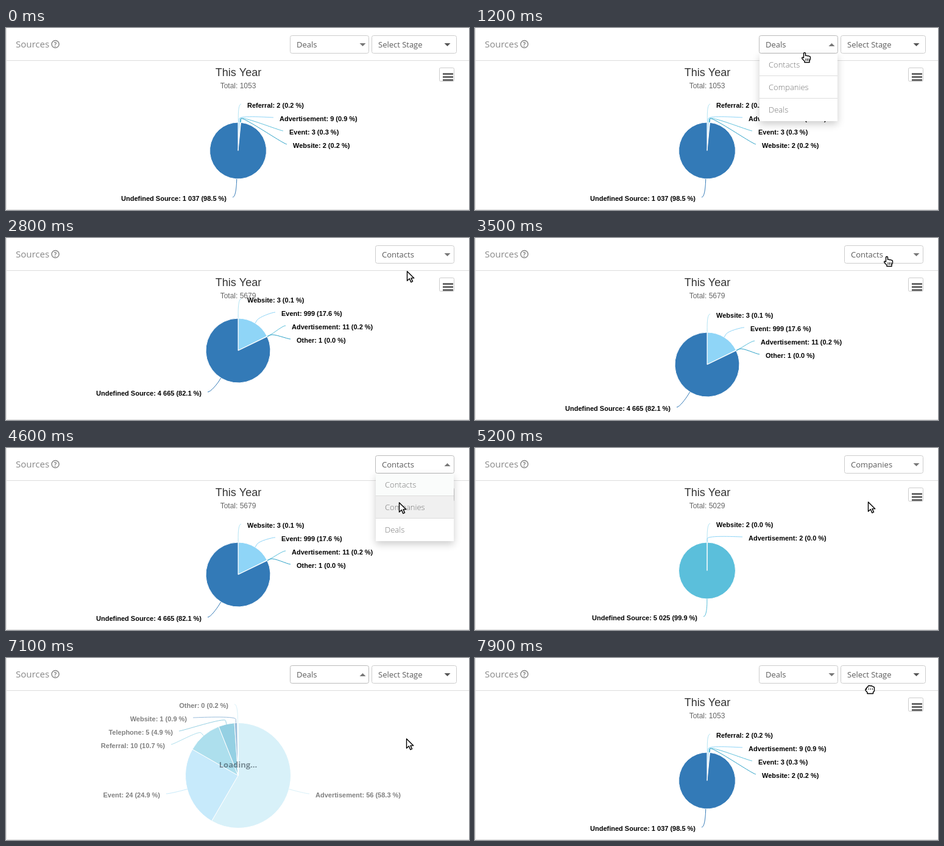
Animation, 760 px wide and 299 px high, one loop 8 s. Source, as an HTML page with a canvas:

```html
<!DOCTYPE html>
<html lang="en">
<head>
<meta charset="utf-8">
<title>Sources</title>
<style>
html, body { margin: 0; width: 100%; height: 100%; overflow: hidden; background: #fff; }
canvas { display: block; }
</style>
</head>
<body>
<canvas id="stage" width="760" height="299"></canvas>
<script>
const c = document.getElementById('stage').getContext('2d');
const LOOP = 8000, CX = 381;
const UI = '"Open Sans", sans-serif', CHART = '"Liberation Sans", Arial, sans-serif';
const PALETTE = ['#b1e3f3', '#8fd5f7', '#5bbfdb', '#2ba1c7', '#337ab7', '#b1e3f3'];
const OPTIONS = ['Contacts', 'Companies', 'Deals'];

// slices: [weight, label, x of the label's near end, baseline]
const charts = {
  Deals: { cy: 201.5, r: 46.5, total: 1053, slices: [
    [2, 'Referral: 2 (0.2 %)', 396, 131],
    [9, 'Advertisement: 9 (0.9 %)', 449, 153],
    [3, 'Event: 3 (0.3 %)', 465, 175],
    [2, 'Website: 2 (0.2 %)', 471, 197],
    [1037, 'Undefined Source: 1 037 (98.5 %)', 362, 284]] },
  Contacts: { cy: 208, r: 53, total: 5679, slices: [
    [3, 'Website: 3 (0.1 %)', 396, 131],
    [999, 'Event: 999 (17.6 %)', 452, 153],
    [11, 'Advertisement: 11 (0.2 %)', 469, 175],
    [1, 'Other: 1 (0.0 %)', 477, 197],
    [4665, 'Undefined Source: 4 665 (82.1 %)', 321, 284]] },
  Companies: { cy: 201.5, r: 46.5, total: 5029, slices: [
    [2, 'Website: 2 (0.0 %)', 396, 130],
    [2, 'Advertisement: 2 (0.0 %)', 449, 152],
    [5025, 'Undefined Source: 5 025 (99.9 %)', 365, 283]] },
  loading: { cy: 193, r: 86.5, slices: [
    [58.3, 'Advertisement: 56 (58.3 %)', 508, 229],
    [24.9, 'Event: 24 (24.9 %)', 253, 229],
    [10.7, 'Referral: 10 (10.7 %)', 261, 148],
    [4.9, 'Telephone: 5 (4.9 %)', 274, 126],
    [0.9, 'Website: 1 (0.9 %)', 297, 104],
    [0.2, 'Other: 0 (0.2 %)', 365, 82]] }
};

// one entry per choice made in the menu
const picks = [
  { from: 'Deals', to: 'Contacts', open: 1000, click: 1600, flip: 2000, show: 2600, settle: 2900 },
  { from: 'Contacts', to: 'Companies', open: 3900, click: 4700, flip: 4900, show: 5000, settle: 5000 },
  { from: 'Companies', to: 'Deals', open: 6400, click: 7000, flip: 7300, show: 7400, settle: 7400 }
];

// pointer track: [time, x, y]
const track = [[400, 568, 0], [700, 569, 25], [1000, 569, 25], [1200, 541, 40], [1500, 528, 54],
  [1850, 528, 54], [2400, 658, 54], [3000, 658, 54], [3400, 677, 32], [3500, 676, 30], [4000, 676, 30],
  [4500, 645, 89], [5250, 645, 88], [5600, 655, 39], [6100, 676, 28], [6450, 676, 28],
  [6900, 657, 132], [7350, 657, 132], [7900, 648, 44]];

const clamp = v => Math.max(0, Math.min(1, v));
const ease = v => v * v * (3 - 2 * v);

function text(str, x, y, font, color, align = 'left') {
  c.font = font;
  c.fillStyle = color;
  c.textAlign = align;
  c.fillText(str, x, y);
}

function box(x, y, w, h, stroke, r = 3) {
  c.beginPath();
  c.roundRect(x + .5, y + .5, w - 1, h - 1, r);
  c.fillStyle = '#fff';
  c.fill();
  c.strokeStyle = stroke;
  c.lineWidth = 1;
  c.stroke();
}

function rect(x, y, w, h, color) {
  c.fillStyle = color;
  c.fillRect(x, y, w, h);
}

function pie({ cy, r, slices }, shift) {
  const sum = slices.reduce((s, [w]) => s + w, 0);
  const y0 = cy - shift * 23;
  let a = -Math.PI / 2;
  slices.forEach(([w, label, x, base], i) => {
    const b = a + w / sum * 2 * Math.PI, mid = (a + b) / 2;
    const at = d => [CX + Math.cos(mid) * (r + d), y0 + Math.sin(mid) * (r + d)];
    const side = mid > Math.PI / 2 ? -1 : 1;
    const y = base - shift * 25;
    c.beginPath();
    c.moveTo(CX, y0);
    c.arc(CX, y0, r, a, b);
    c.closePath();
    c.fillStyle = PALETTE[i];
    c.fill();
    c.lineWidth = 1;
    c.lineJoin = 'round';
    c.strokeStyle = '#fff';
    c.stroke();
    c.beginPath();
    c.moveTo(x - side * 10, y - 6);
    c.bezierCurveTo(x - side * 15, y - 6, ...at(12), ...at(6));
    c.lineTo(...at(0));
    c.strokeStyle = PALETTE[i];
    c.stroke();
    text(label, x, y, 'bold 11px ' + CHART, '#000', side > 0 ? 'left' : 'right');
    a = b;
  });
}

function chart(name, shift) {
  const data = charts[name];
  if (data.total) {
    text('This Year', 381.5, 79, '18px ' + CHART, '#333', 'center');
    text('Total: ' + data.total, CX, 99, '12px ' + CHART, '#666', 'center');
    box(711, 65, 25, 23, '#ccc', 2);
    for (const y of [74, 79, 84]) rect(717, y, 17, 3, '#666');
  }
  pie(data, shift);
  if (!data.total) {
    rect(1, 54, 759, 244, 'rgba(255,255,255,.5)');
    text('Loading...', CX, 180, 'bold 13px ' + UI, 'rgba(40,55,65,.55)', 'center');
  }
}

function select(x, w, label, arrowX, up, color) {
  box(x, 12, w, 30, up ? '#bbb' : '#ccc');
  text(label, x + 11, 32, '13px ' + UI, '#5c5c5c');
  const y = up ? 30 : 25, tip = up ? 25 : 30;
  c.beginPath();
  c.moveTo(arrowX - 5, y);
  c.lineTo(arrowX + 5, y);
  c.lineTo(arrowX, tip);
  c.fillStyle = color;
  c.fill();
}

function menu(x, chosen, p) {
  c.save();
  c.shadowColor = 'rgba(0,0,0,.2)';
  c.shadowBlur = 12;
  c.shadowOffsetY = 5;
  rect(x + 1, 42, 128, 111, '#fff');
  c.restore();
  OPTIONS.forEach((name, i) => {
    const y = 42 + i * 37;
    const over = p.y > y && p.y < y + 37 && p.x > x && p.x < x + 130;
    if (over || name === chosen && i < 2) rect(x + 1, y, 128, 36, over ? '#f0f0f0' : '#fafcfb');
    if (i < 2) rect(x + 1, y + 36, 128, 1, '#ddd');
    text(name, x + 16, y + 23, '300 13px ' + UI, '#777');
  });
}

function pointer(t) {
  if (t < track[0][0]) return { x: -99, y: -99 };
  const i = track.findIndex(k => k[0] > t);
  if (i < 0) return { x: track.at(-1)[1], y: track.at(-1)[2] };
  const [ta, xa, ya] = track[i - 1], [tb, xb, yb] = track[i];
  const k = ease((t - ta) / (tb - ta));
  return { x: Math.round(xa + (xb - xa) * k), y: Math.round(ya + (yb - ya) * k) };
}

const shapes = {
  arrow: 'M.5 .8V16.2L4.3 12.8L6.9 18.6L9.5 17.4L7 11.9H11.8Z',
  hand: 'M-1.5 9V1.5Q0 -.5 1.5 1.5V5.5Q3.3 4.5 4.5 6Q6.3 5 7.3 6.6Q9.5 6 9.5 8.5V11L8 14V16.5H0V14.5L-4 10.5Q-5 7.5 -2.5 8.5Z',
  fist: 'M-5.5 8V5.5Q-5 3.5 -3 4V2.5Q-1 .5 .5 2Q2.5 .8 3.7 2.5Q5.6 2 6 3.5Q8 3.5 7.5 6V10L5.5 12.5V14.5H-4V12.5L-7 9Q-7.5 6.5 -5.5 6.5'
};
for (const k in shapes) shapes[k] = new Path2D(shapes[k]);

function drawPointer({ x, y }, t) {
  const kind = t >= 7800 ? 'fist' : y > 11 && y < 42 ? 'hand' : 'arrow';
  c.save();
  c.translate(x, y);
  c.fillStyle = '#fff';
  c.strokeStyle = '#000';
  c.lineWidth = 1.4;
  c.lineJoin = 'round';
  c.fill(shapes[kind]);
  c.stroke(shapes[kind]);
  if (kind === 'hand') for (const k of [1.5, 4, 6.5]) rect(k, 10, 1, 4, '#000');
  if (kind === 'fist') for (const k of [-2, 1, 4]) rect(k, 6, 1, 2, '#000');
  c.restore();
}

function draw(t) {
  const pick = picks.findLast(p => t >= p.open) || { to: 'Deals', click: 0, flip: 0, show: 0, settle: -999 };
  const isOpen = t < pick.click, up = t < pick.flip;
  const value = isOpen ? pick.from : pick.to;
  const view = isOpen ? pick.from : t < pick.show ? 'loading' : pick.to;
  const shift = view === pick.to ? 1 - ease(clamp((t - pick.settle) / 200)) : 0;
  const x = value === 'Deals' ? 466 : 606;
  const p = pointer(t);

  rect(0, 0, 760, 299, '#fff');
  chart(view, shift);
  rect(0, 53, 760, 1, '#ddd');
  rect(0, 0, 1, 298, '#ddd');
  rect(1, 298, 759, 1, '#ddd');
  text('Sources', 16, 32, '15px ' + UI, '#888');
  c.beginPath();
  c.arc(81, 26.5, 6, 0, 7);
  c.strokeStyle = '#888';
  c.lineWidth = 1.5;
  c.stroke();
  text('?', 81, 30.5, 'bold 10px ' + UI, '#888', 'center');

  if (value === 'Deals') select(600, 140, 'Select Stage', 724.5, false, '#555');
  select(x, 130, value, x === 466 ? 585.5 : 724.5, up, '#777');
  if (isOpen) menu(x, pick.from, p);
  drawPointer(p, t);
}

function frame() {
  draw(performance.now() % LOOP);
  requestAnimationFrame(frame);
}
frame();
</script>
</body>
</html>
```
